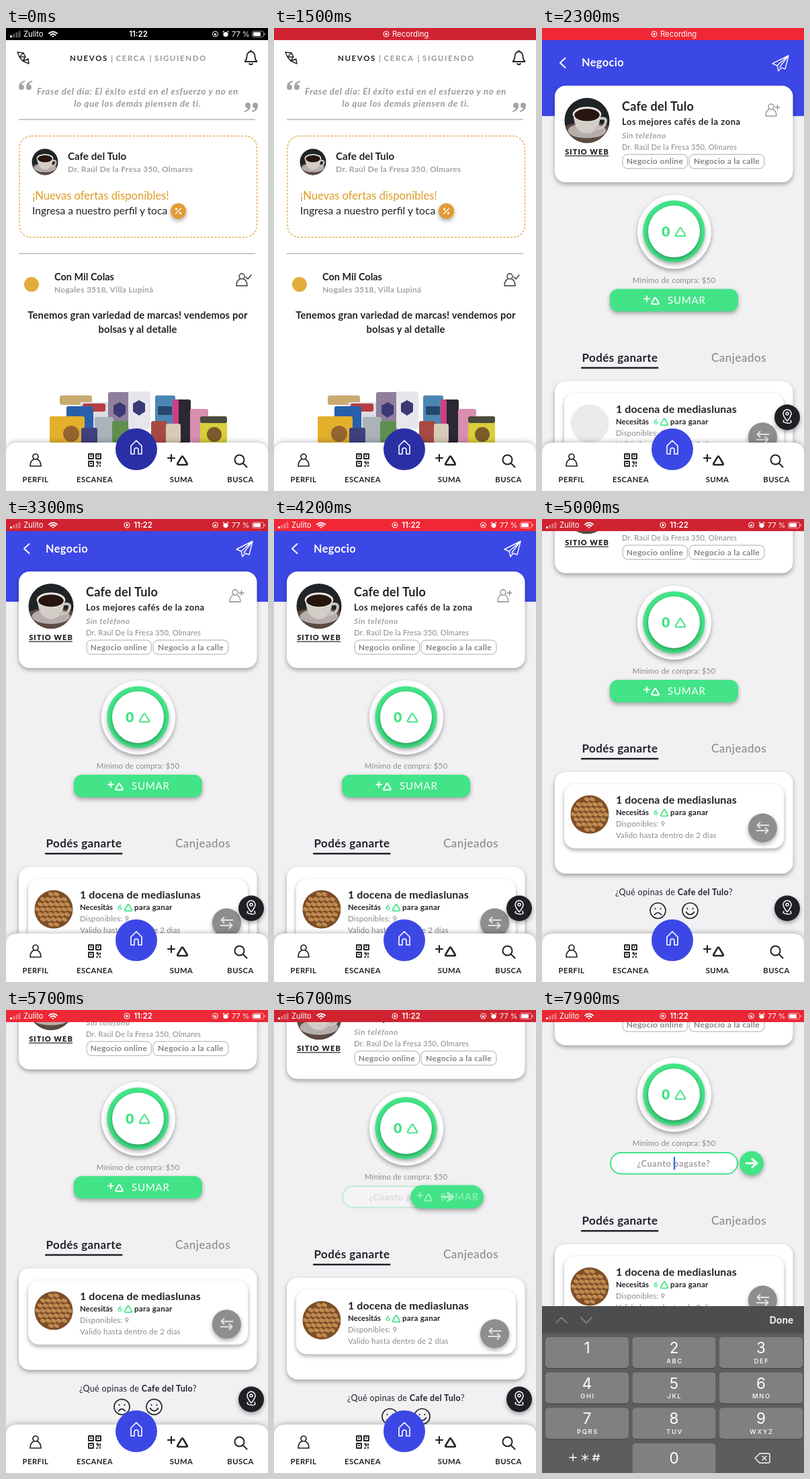
An HTML page for the animation above (8000 ms loop, 390 by 688 pixels).

```html
<!DOCTYPE html>
<html lang="es">
<head>
<meta charset="utf-8">
<title>Negocio</title>
<style>
html, body { margin: 0; width: 100%; height: 100%; overflow: hidden; background: #fff; }
svg { display: block; width: 100vw; height: 100vh; font-family: Lato, "Open Sans", sans-serif; }
.ui { font-family: Inter, Roboto, sans-serif; }
.sh { filter: drop-shadow(0 3px 3px #0005); }
.up { filter: drop-shadow(0 -1px 4px #0004); }
.ic { fill: none; stroke-linecap: round; stroke-linejoin: round; }
</style>
</head>
<body>
<svg id="stage" viewBox="0 0 390 688" preserveAspectRatio="none"></svg>
<script>
const INK = '#222227', GREY = '#999', GREEN = '#42e487', BLUE = '#3c48e6';
const shop = 'Cafe del Tulo', street = 'Dr. Raúl De la Fresa 350, Olmares';

// Markup helpers
const text = (x, y, size, str, o = {}) =>
  `<text x="${x}" y="${y}" font-size="${size}" fill="${o.fill || INK}" font-weight="${o.w || 400}"` +
  ` letter-spacing="${o.ls || 0}" text-anchor="${o.mid ? 'middle' : 'start'}"` +
  `${o.it ? ' font-style="italic"' : ''}>${str}</text>`;
const box = (x, y, w, h, r, fill, more = '') =>
  `<rect x="${x}" y="${y}" width="${w}" height="${h}" rx="${r}" fill="${fill}" ${more}/>`;
const disc = (x, y, r, fill, more = '') => `<circle cx="${x}" cy="${y}" r="${r}" fill="${fill}" ${more}/>`;
const icon = (x, y, d, color = INK, width = 1.6) =>
  `<path class="ic" transform="translate(${x} ${y})" d="${d}" stroke="${color}" stroke-width="${width}"/>`;
const group = (id, body, more = '') => `<g id="${id}" ${more}>${body}</g>`;
const at = (x, y, body) => `<g transform="translate(${x} ${y})">${body}</g>`;

const PERSON = 'M-4 -5a4 4 0 1 0 8 0a4 4 0 1 0 -8 0M-3 -1C-7 1 -8 5 -8 9H8C8 5 7 1 3 -1';
const TRI = 'M-1.2 -5.6Q0 -7.4 1.2 -5.6L7 4Q8 6 6 6H-6Q-8 6 -7 4Z';
const SMALL_TRI = 'M-.9 -4Q0 -5.4 .9 -4L5 3Q6 5 4 5H-4Q-6 5 -5 3Z';
const ARROW = 'M-8 0H7M1 -6L8 0L1 6';

const coffee = (x, y, r) => `<g transform="translate(${x} ${y}) scale(${r / 33})">` +
  disc(0, 0, 33, '#1f2426') +
  '<path d="M-32 8A33 33 0 0 0 32 8Q0 -4 -32 8" fill="#5c4a42"/>' +
  '<ellipse cx="0" cy="15" rx="28" ry="11" fill="#b5aeaa"/>' +
  '<path d="M-20 -9Q-18 19 0 19T20 -9Z" fill="#d3cdc8"/>' +
  '<path class="ic" d="M19 -3Q30 -5 27 4T13 11" stroke="#c9c3be" stroke-width="4"/>' +
  '<ellipse cy="-9" rx="21" ry="11" fill="#ebe7e3"/>' +
  '<ellipse cy="-8" rx="18.5" ry="9" fill="#27150f"/></g>';

function pastries() {
  let s = disc(0, 0, 28.5, '#7d4f28');
  for (let row = -3; row <= 3; row++)
    for (let col = -3; col <= 3; col++) {
      const x = col * 8 + (row & 1) * 4, y = row * 7.5;
      if (Math.hypot(x, y) < 25)
        s += `<ellipse cx="${x}" cy="${y}" rx="4.2" ry="2.7" fill="#c08a50" transform="rotate(25 ${x} ${y})"/>`;
    }
  return s;
}

const bags = [
  [80, 546, 48, 14, '#c9ab72'], [110, 556, 42, 50, '#dcdde4'], [114, 558, 34, 12, '#b83c40'],
  [152, 541, 34, 56, '#8f7f9c'], [182, 540, 33, 56, '#e8e6ed'], [222, 546, 30, 54, '#4c87b4'],
  [251, 552, 24, 64, '#2b2833'], [248, 552, 9, 64, '#cf3f85'], [274, 566, 27, 50, '#d98fb0'],
  [90, 562, 40, 54, '#285fab'], [65, 577, 52, 40, '#e3b02c'], [289, 577, 40, 40, '#d8cf3a'],
  [289, 577, 40, 10, '#4a4b3c'], [132, 578, 28, 38, '#a9b3b8'], [158, 584, 24, 32, '#5f8f4e'],
  [216, 584, 24, 32, '#a84a44'], [238, 588, 22, 28, '#d5cbb8'], [112, 594, 24, 24, '#41407f']
].map(([x, y, w, h, c]) => box(x, y, w, h, 3, c)).join('') +
  '<path d="M198 553l9 5v12l-9 6l-9 -6v-12zM169 556l9 5v12l-9 6l-9 -6v-12z" fill="#3a3974"/>' +
  disc(97, 603, 12, '#94652f') + disc(310, 604, 11, '#7d5a2c') + box(226, 562, 21, 13, 2, '#27476d');

const quote = (x, y, turn) => `<path transform="translate(${x} ${y}) rotate(${turn})" fill="#a3a3a3" ` +
  'd="M-1 -7Q-10 -5 -10 3A4 4 0 1 0 -6 -1Q-5 -4 -1 -5ZM10 -7Q1 -5 1 3A4 4 0 1 0 5 -1Q6 -4 10 -5Z"/>';

const top1 = { w: 700, ls: 1.6 }, top2 = { ...top1, fill: GREY };
const soft = { w: 700, ls: .25, fill: '#a3a3a3' };
const motto = { w: 700, it: 1, mid: 1, ls: .6, fill: '#9d9d9d' };
const home = box(0, 0, 390, 688, 0, '#fff') +
  icon(25, 44, 'M-8 -8L1 -7L-5 -1ZM-5 -1L4 -1L0 5ZM1 -7L4 -1M0 5L8 2L9 9Z', INK, 1.4) +
  text(95, 49, 11.5, 'NUEVOS', top1) + text(156, 49, 12, '|', top2) + text(163.5, 49, 11.5, 'CERCA', top2) +
  text(213.5, 49, 12, '|', top2) + text(221, 49, 11.5, 'SIGUIENDO', top2) +
  icon(364.5, 44, 'M-9 6Q-6 3 -6 -2A6 7 0 0 1 6 -2Q6 3 9 6ZM-2.5 9Q0 11.5 2.5 9M0 -9V-10.5', INK, 1.8) +
  quote(29, 85, 0) + quote(365, 118, 180) +
  text(196, 98.5, 13.5, 'Frase del día: El éxito está en el esfuerzo y no en', motto) +
  text(196, 117, 13.5, 'lo que los demás piensen de ti.', motto) +
  box(19, 135.3, 352, 1.4, 0, '#b3b3b3') +
  box(20, 160.5, 353.5, 150.5, 18, 'none', 'stroke="#e3ad4f" stroke-width="1.4" stroke-dasharray="3 2.2"') +
  coffee(58, 199, 19.5) + text(92, 195.5, 15.2, shop, { w: 700 }) + text(92, 214, 12, street, soft) +
  text(39, 255, 16.6, '¡Nuevas ofertas disponibles!', { fill: '#dd9c25' }) +
  text(39, 277, 15.6, 'Ingresa a nuestro perfil y toca') +
  disc(256.5, 272, 11.5, '#e39b34', 'class="sh"') +
  icon(256.5, 272, 'M-4 4L4 -4M-4 -3a1 1 0 1 0 2 0a1 1 0 1 0 -2 0M2 3a1 1 0 1 0 2 0a1 1 0 1 0 -2 0', '#fff', 1.4) +
  box(19, 334.6, 352, 1.4, 0, '#b3b3b3') +
  disc(38, 381, 11, '#e2ad3c') +
  text(72, 375, 14.5, 'Con Mil Colas', { w: 700 }) + text(72, 392.5, 12, 'Nogales 3518, Villa Lupiná', soft) +
  icon(351, 374, PERSON + 'M6 -4L9 -1L14 -7', '#333', 1.4) +
  text(196, 432, 14.8, 'Tenemos gran variedad de marcas! vendemos por', { w: 700, mid: 1, ls: .12 }) +
  text(196, 453, 14.8, 'bolsas y al detalle', { w: 700, mid: 1, ls: .12 }) + bags;

const tag = { w: 700, mid: 1, ls: .3, fill: '#858585' };
const fine = { fill: '#8b8b8b', ls: .15 };
const tagBox = 'stroke="#aaa" stroke-width="1"';
const face = (x, mouth) => icon(x, 723, 'M-11.5 0a11.5 11.5 0 1 0 23 0a11.5 11.5 0 1 0 -23 0' +
  'M-4 -3.5v1M4 -3.5v1' + mouth, INK, 1.7);

const header = box(0, -60, 390, 183, 0, BLUE) +
  icon(31, 44, 'M3.5 -7L-4 0L3.5 7', '#fff', 2) +
  text(59, 49.5, 16.3, 'Negocio', { w: 700, fill: '#fff', ls: .4 }) +
  icon(355, 44, 'M12 -11L-12 1L-5 4L-3 12L1 7L7 9ZM12 -11L-5 4M12 -11L-1 6', '#fff', 1.4);

const card = box(19, 78, 354.5, 143.5, 16, '#fff', 'class="sh"') +
  coffee(67, 129.5, 33.5) +
  text(67, 180, 11, 'SITIO WEB', { w: 900, ls: 1, mid: 1 }) + box(34, 181.6, 65, 1.2, 0, INK) +
  text(119, 115, 18, shop, { w: 700, ls: .3 }) +
  text(119, 136, 13, 'Los mejores cafés de la zona', { w: 700, ls: .5 }) +
  text(119, 156, 12, 'Sin teléfono', { w: 700, it: 1, ls: .5, fill: '#a5a5a5' }) +
  text(119, 173, 11.3, street, fine) +
  box(120, 180, 96.5, 21, 7, '#fff', tagBox) + text(168, 194.5, 12, 'Negocio online', tag) +
  box(219, 180, 112, 21, 7, '#fff', tagBox) + text(275, 194.5, 12, 'Negocio a la calle', tag) +
  icon(341, 114, PERSON + 'M6 -4H13M9.5 -7.5V-.5', '#888', 1.3);

const score = disc(197, 295, 55, '#fff', 'class="sh"') +
  disc(196.5, 294.5, 46, GREEN, 'class="sh"') +
  disc(196.5, 294.5, 38.5, '#fff', 'class="sh"') +
  text(178, 302, 21.5, '0', { w: 900, fill: GREEN }) + icon(206, 295.5, TRI, GREEN, 2) +
  text(196.5, 371, 11.5, 'Mínimo de compra: $50', { ...fine, mid: 1 });

const adder = group('field',
    box(102, 381, 189, 31.5, 15.7, '#fff', `stroke="${GREEN}" stroke-width="2"`) +
    text(196, 401.5, 13, '¿Cuanto pagaste?', { mid: 1, w: 700, ls: .5, fill: '#a0a0a0' }) +
    box(195.8, 387, 2.4, 19.5, 1, '#3c6fe0', 'id="caret"')) +
  box(101, 380, 191, 33.5, 12, GREEN, 'id="pill" class="sh"') +
  group('label', icon(156, 394.5, 'M-4 0H4M0 -4V4', '#fff', 1.8) + icon(168.5, 397.5, SMALL_TRI, '#fff', 2) +
    text(187, 402.2, 15, 'SUMAR', { fill: '#fff', ls: .8 })) +
  group('arrow', icon(0, 396.7, ARROW, '#fff', 3));

const prize = box(19, 517, 354.5, 151, 16, '#fff', 'class="sh"') +
  box(33, 535, 327, 95.5, 16, '#fff', 'class="sh"') +
  disc(71, 580, 28.5, '#ebebeb') + group('photo', at(71, 580, pastries())) +
  text(110, 564, 16, '1 docena de mediaslunas', { w: 700, ls: .1 }) +
  text(110, 581, 11.4, 'Necesitás', { w: 700 }) + text(166, 581, 12, '6', { w: 700, fill: GREEN }) +
  icon(182, 577.3, SMALL_TRI, GREEN, 1.8) + text(191, 581, 11.6, 'para ganar', { w: 700, ls: .25 }) +
  text(110, 598, 11.5, 'Disponibles: 9', fine) +
  text(110, 615, 11.5, 'Valido hasta dentro de 2 días', fine) +
  disc(328.5, 600, 21.5, '#8e8e8e', 'class="sh"') +
  icon(328.5, 600, 'M9 -4H-8M-4 -8L-8 -4L-4 0M-9 4H8M4 0L8 4L4 8', '#e2e2e2', 2);

const shopPage = box(0, 0, 390, 688, 0, '#f1f0f3') + group('scroller', header + card + score + adder +
  text(116, 488, 17, 'Podés ganarte', { w: 700, mid: 1, ls: .4 }) + box(58, 496, 115.5, 2.4, 1, INK) +
  text(293, 488, 17, 'Canjeados', { w: 500, mid: 1, ls: .5, fill: '#8c8c8c' }) + prize +
  text(196.5, 700, 12.5, `¿Qué opinas de <tspan font-weight="700">${shop}</tspan>?`, { mid: 1, ls: .35 }) +
  face(172.5, 'M-5 6Q0 0 5 6') + face(220.5, 'M-6 2Q0 10 6 2')) +
  disc(365, 578.5, 19, '#202024', 'class="sh"') +
  icon(365, 576, 'M0 8Q-6 1 -6 -3A6 6 0 0 1 6 -3Q6 1 0 8ZM-2 -3a2 2 0 1 0 4 0a2 2 0 1 0 -4 0M-5 7Q-8 10 0 11T5 7', '#fff', 1.5);

const grid = 'M-9 -9h7v7h-7zM2 -9h7v7h-7zM-9 2h7v7h-7zM-6 -6h1M5 -6h1M-6 5h1M3 3h2v3M8 3v2M3 9h1M8 9V8';
const tab = { w: 700, mid: 1, ls: .4 };
const nav = '<path class="up" d="M0 700V632Q0 616 18 616H372Q390 616 390 632V700Z" fill="#fff"/>' +
  disc(194, 626, 31, BLUE, 'id="homeButton"') +
  icon(194, 623, 'M-8 -2L0 -10L8 -2V10H3V4Q3 1 0 1T-3 4V10H-8Z', '#fff', 1.6) +
  icon(44, 642, PERSON, INK, 1.7) + icon(132, 642, grid, INK, 1.9) +
  icon(246, 639, 'M-5 0H5M0 -5V5', INK, 2.2) + icon(262.5, 643, TRI, INK, 2.6) +
  icon(349, 643, 'M-8.5 -1.5a7 7 0 1 0 14 0a7 7 0 1 0 -14 0M4 4L9.5 9.5', INK, 2) +
  text(44, 675, 11.3, 'PERFIL', tab) + text(132, 675, 11.3, 'ESCANEA', tab) +
  text(261, 675, 11.3, 'SUMA', tab) + text(349, 675, 11.3, 'BUSCA', tab);

function keyboard() {
  const letters = ['', 'ABC', 'DEF', 'GHI', 'JKL', 'MNO', 'PQRS', 'TUV', 'WXYZ'];
  const white = { fill: '#fff', mid: 1 };
  const key = (x, y) => box(x, y + 1, 124, 46, 5, '#414043') + box(x, y, 124, 46, 5, '#807f82');
  let s = box(0, 440, 390, 260, 0, '#5d5c5f') + box(0, 440, 390, 40.5, 0, '#4d4d50') +
    icon(29, 461, 'M-8 4L0 -4L8 4', '#8c8c8f') + icon(66, 461, 'M-8 -4L0 4L8 -4', '#8c8c8f') +
    text(356.5, 466, 14, 'Done', { ...white, w: 600 });
  letters.forEach((sub, i) => {
    const x = 5 + i % 3 * 129.5, y = 486 + Math.floor(i / 3) * 52.6;
    s += key(x, y) + text(x + 62, y + 24, 22.5, i + 1, white) +
      text(x + 63, y + 38.5, 9.5, sub, { ...white, w: 500, ls: 1.6 });
  });
  return s + key(134.5, 644) + text(196.5, 674, 22.5, '0', white) +
    icon(46, 665, 'M-5 0H5M0 -5V5M18 -5V5M13.5 -2.5L22.5 2.5M22.5 -2.5L13.5 2.5M33 -5L31 5M38 -5L36 5M30 -2H40M29 2H39', '#fff', 1.4) +
    icon(328, 666, 'M-4 -7H9Q11 -7 11 -5V5Q11 7 9 7H-4L-11 0ZM0 -3L6 3M6 -3L0 3', '#fff', 1.4);
}

const white = { fill: '#fff' };
const ring = x => disc(x, 9, 4, 'none', 'stroke="#fff" stroke-width="1.1"') + disc(x, 9, 1.7, '#fff');
const bars = [0, 1, 2, 3].map(i =>
  box(6 + i * 4.2, 11 - i * 2.2, 3, 3 + i * 2.2, .6, '#fff', `opacity="${i ? .35 : 1}"`)).join('');
const details = bars + text(26, 13, 11.3, 'Zulito', white) +
  icon(70, 12, 'M-6 -4Q0 -9 6 -4M-3.6 -1.6Q0 -4.6 3.6 -1.6M-.4 .6H.4', '#fff', 2) +
  group('rec', ring(180)) + group('clock', text(197, 13.3, 11.5, '11:22', { ...white, w: 600, mid: 1 })) +
  disc(311.5, 9, 4, 'none', 'stroke="#fff" stroke-width="1"') + box(310, 8, 3, 3, .5, '#fff') +
  disc(327, 9.5, 3.6, '#fff') + icon(327, 9, 'M-4 -3L-2.5 -4.2M4 -3L2.5 -4.2', '#fff', 1.2) +
  text(336, 13.2, 11, '77 %', white) +
  box(366.5, 4.8, 17, 8.6, 2.4, 'none', 'stroke="#fff" stroke-opacity=".6"') +
  box(368, 6.3, 11, 5.6, 1.2, '#fff') + box(384.6, 7.5, 1.4, 3.2, .7, '#fff', 'opacity=".6"');
const status = box(0, 0, 390, 18, 0, '#000', 'id="bar"') + group('details', details) +
  group('recording', ring(167) + text(176, 13.2, 11.3, 'Recording', white));

document.getElementById('stage').innerHTML = home + group('page', shopPage) + nav +
  group('keys', keyboard(), 'class="ui"') + group('status', status, 'class="ui"');

// Motion
const $ = id => document.getElementById(id);
const set = (id, name, value) => $(id).setAttribute(name, value);
const show = (id, on) => set(id, 'display', on ? 'inline' : 'none');
const move = (id, x, y) => set(id, 'transform', `translate(${x} ${y})`);
const part = (t, from, length) => Math.min(1, Math.max(0, (t - from) / length));
const smooth = p => p * p * (3 - 2 * p);
const out = p => 1 - (1 - p) ** 3;
const mix = (a, b, p) => a + (b - a) * p;

function draw(t) {
  // Status bar: black, then a pulsing red
  const live = t >= 900, notice = live && t < 3100;
  const glow = .5 - .5 * Math.cos((t - 1500) / 1750 * 2 * Math.PI);
  const red = [[208, 241], [35, 40], [49, 54]].map(([a, b]) => Math.round(mix(a, b, glow)));
  set('bar', 'fill', live ? `rgb(${red})` : '#000');
  show('details', !notice);
  show('recording', notice);
  show('rec', live);
  move('clock', live ? 7 : 0, 0);

  // Page entry and scrolling
  const rise = 40 * (1 - out(part(t, 2150, 360)));
  const scroll = 141 * smooth(part(t, 4300, 650)) - 22 * smooth(part(t, 5500, 500)) +
    50 * out(part(t, 7050, 400));
  show('page', t >= 2150);
  set('page', 'opacity', part(t, 2130, 120));
  move('scroller', 0, rise - scroll);
  set('photo', 'opacity', part(t, 2550, 200));
  set('homeButton', 'fill', t < 2150 ? '#2a2fa6' : BLUE);

  // The button shrinks to the right and uncovers the field
  const p = smooth(part(t, 6545, 300));
  const left = mix(101, 294, p), right = mix(292, 330, p), height = mix(33.5, 36, p);
  set('pill', 'x', left);
  set('pill', 'width', right - left);
  set('pill', 'y', 396.7 - height / 2);
  set('pill', 'height', height);
  set('pill', 'rx', mix(12, 18, Math.min(1, p * 2)));
  move('label', (left + right) / 2 - 196.5, 0);
  set('label', 'opacity', 1 - p);
  move('arrow', (left + right) / 2, 0);
  set('arrow', 'opacity', p);
  set('field', 'opacity', p * p);
  show('caret', t >= 7050);

  // Keyboard
  show('keys', t >= 7050);
  move('keys', 0, 250 * (1 - out(part(t, 7050, 400))));
}

const start = performance.now();
function tick() {
  draw((performance.now() - start) % 8000);
  requestAnimationFrame(tick);
}
tick();
</script>
</body>
</html>
```
